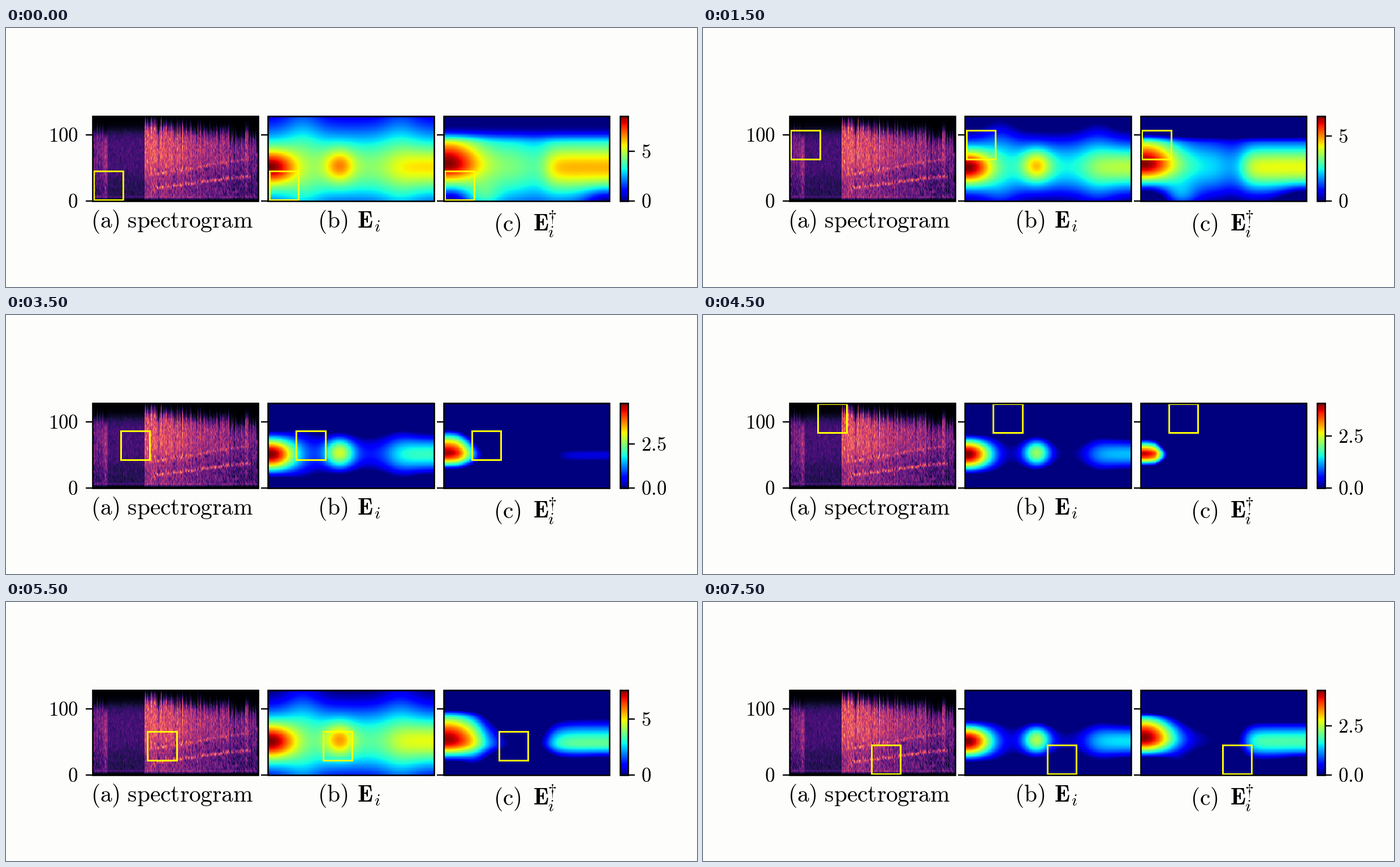
Animation of 1222 by 458 pixels, one loop 8000 ms. Source, as a matplotlib script:

```python
import numpy as np
import matplotlib.pyplot as plt
from matplotlib.animation import FuncAnimation
from matplotlib.patches import Rectangle

W, H, DPI = 1222, 458, 64
PT = 72 / DPI                      # points per pixel
TOP, BOTTOM = 156, 306.3
PANELS = [(152.8 + 310.6 * i, 446.1 + 310.6 * i) for i in range(3)]
BAR = (1085.7, 1100.4)
COLS, ROWS = 250, 128
STEPS = 5                          # box positions per column
PEAK = 8.5

plt.rcParams["mathtext.fontset"] = "cm"

# Scale maximum per box column: start, total fall, exponent of the fall
SCALE = [(8.5, 3.7, 2.2), (5.52, 1.44, 1), (8.6, 4.16, 1), (4.31, 0, 1)]


def gauss(v, center, width):
    return np.exp(-((v - center) / width) ** 2)


def sigmoid(v):
    return 1 / (1 + np.exp(-v))


def smoothstep(v):
    v = np.clip(v, 0, 1)
    return v * v * (3 - 2 * v)


def centers(panel):
    a, b = panel
    return a + (np.arange(COLS) + .5) * (b - a) / COLS


def spectrogram():
    rng = np.random.default_rng(7)
    c, r = np.arange(COLS), np.arange(ROWS)[:, None]
    loud, lead = c >= 78, c < 23
    streak = rng.normal(0, 1, COLS)
    level = np.where(loud, .33 + .3 * gauss(c, 78, 110),
                     np.where(lead, .33 + .2 * gauss(c, 19, 3), .23))
    level += np.where(loud, .05, np.where(lead, .04, .008)) * streak
    level += .12 * gauss(c, 231, 1.5)

    # Ragged upper edge, darker lower half
    reach = np.where(loud, 114 - .13 * (c - 78) + 6 * streak, 104 + 5 * lead * streak)
    reach += 15 * gauss(c, 231, 2)
    fade = sigmoid((reach - r) / np.where(loud | lead, 4, 5))
    low = sigmoid((40 + .08 * (c - 78) - r) / 8)
    body = level * (1 - .36 * low)

    grain = rng.normal(0, 1, (ROWS, COLS))
    grain = sum(np.roll(grain, i, 0) for i in range(4)) / 2
    body += grain * np.where(loud, .075, np.where(lead, .06, .032))
    for c0, r0, c1, r1, gain in [(88, 19, 232, 37, .22), (85, 39, 230, 62, .11)]:
        line = r0 + (c - c0) * (r1 - r0) / (c1 - c0) + .7 * streak
        inside = (c >= c0) & (c <= c1 + 5)
        body += gain * gauss(r, line, 2.6) * inside * (1 + .4 * grain)
    body += .08 * gauss(r, 6, 1.5)
    return np.clip(body * fade * np.clip((r - 1) / 3, 0, 1), 0, 1)


Y = (BOTTOM + (np.arange(ROWS) + .5) * (TOP - BOTTOM) / ROWS)[:, None]


def map_plain():
    x = centers(PANELS[1])
    band = 4.3 * gauss(Y, 246, 70)
    edges = (.9 * gauss(x, 525, 35) + .7 * gauss(x, 697, 35)) * (1 - gauss(Y, 246, 40))
    left = 4.2 * gauss(x, 468, 44) * gauss(Y, 247, 30)
    middle = 2.3 * gauss(x, 590, 26) * gauss(Y, 244, 29)
    right = 1.4 * sigmoid((x - 680) / 12) * gauss(Y, 247, 32)
    return band + edges + left + middle + right


def map_dagger():
    x = centers(PANELS[2])
    band = (4.2 - .4 * gauss(x, 935, 25)) * gauss(Y, 245, 75)
    left = 4.3 * gauss(x, 780, 56) * gauss(Y, 240, np.where(Y < 240, 50, 31))
    right = 1.9 * sigmoid((x - 958) / 8) * gauss(Y, 248, 35)
    hollows = (gauss(x, 785, 32) + gauss(x, 1062, 40)) * gauss(Y, 307, 25)
    foot = gauss(x, 845, 30) * gauss(Y, 300, 25)
    total = band + left + right - 2.2 * hollows + 1.2 * foot
    return total * smoothstep((Y - 172) / 34)


def damping():
    x = centers(PANELS[2])
    across = 1.6 * sigmoid((x - 840) / 8) + 2.5 * gauss(x, 915, 45)
    return across + .03 * np.maximum(0, 248 - Y) + .08 * np.maximum(0, Y - 255)


def squeezing():
    x = centers(PANELS[2])
    return np.clip(.09 * (x - 800), 0, 3) + .08 * np.maximum(0, 245 - Y)


plain, dagger, damp, squeeze = map_plain(), map_dagger(), damping(), squeezing()

fig = plt.figure(figsize=(W / DPI, H / DPI), dpi=DPI, facecolor="#fdfdfc")
ax = fig.add_axes([0, 0, 1, 1])


def image(data, span, cmap):
    return ax.imshow(data, cmap=cmap, vmin=0, vmax=1, origin="lower", aspect="auto",
                     extent=(*span, BOTTOM, TOP), interpolation="nearest", zorder=1)


def frame(span):
    return ax.add_patch(Rectangle((span[0], TOP), span[1] - span[0], BOTTOM - TOP,
                                  fill=False, lw=2.6 * PT, ec="black", zorder=4))


def tick(x, y):
    return ax.plot([x, x + 12], [y, y], color="black", lw=2.4 * PT,
                   solid_capstyle="butt", zorder=3)[0]


def label(x, y, text, size, ha="left"):
    return ax.text(x, y, f"${text}$", fontsize=size * PT, ha=ha, va="baseline")


image(spectrogram(), PANELS[0], "magma")
image_b = image(plain, PANELS[1], "jet")
image_c = image(dagger, PANELS[2], "jet")
image(np.linspace(0, 1, 256)[:, None], BAR, "jet")

boxes = []
for span in PANELS:
    border = frame(span)
    for y in (188.5, 305.6):
        tick(span[0] - 12, y)
    box = Rectangle((0, 0), 51.4, 51, fill=False, ec="yellow", lw=3 * PT, zorder=2)
    ax.add_patch(box).set_clip_path(border)
    boxes.append(box)
frame(BAR)

DIGIT, BODY, SMALL = 34.9, 41.4, 30
label(127.5, 200.6, "100", DIGIT, "right")
label(127.5, 317.6, "0", DIGIT, "right")
label(150, 353, r"\mathrm{(a)\ spectrogram}", BODY)
for x, y, name in [(551, 353, "b"), (862, 358.5, "c")]:
    label(x, y, rf"\mathrm{{({name})}}", BODY)
    label(x + 70, y, r"\mathbf{E}", BODY)
label(651, 360, "i", SMALL)
label(957.5, 370.5, "i", SMALL)
label(957.5, 341, r"\dagger", SMALL)

tick(BAR[1], 305.6)
zero = label(1123, 317.6, "0", DIGIT)
mark = tick(BAR[1], 218)
value = label(1123, 230, "5", DIGIT)

ax.set(xlim=(0, W), ylim=(H, 0))
ax.axis("off")


def update(k):
    col, row = divmod(k, STEPS)
    for box, span in zip(boxes, PANELS):
        box.set_xy((span[0] + 2.3 + 47.6 * col, 252.5 - 23.8 * row))

    start, fall, power = SCALE[col]
    vmax = start - fall * (row / (STEPS - 1)) ** power
    drop = PEAK - vmax
    loss = (damp * np.interp(k, [5, 9, 11, 15], [0, 1.2, 1, 0])
            + squeeze * np.interp(k, [6, 9, 10], [0, 1, 0]))
    image_b.set_data(np.clip((plain - drop) / vmax, 0, 1))
    image_c.set_data(np.clip((dagger - drop - loss) / vmax, 0, 1))

    step = 5 if vmax >= 5 else 2.5
    y = BOTTOM - (BOTTOM - TOP) * step / vmax
    mark.set_ydata([y, y])
    value.set_y(y + 12)
    value.set_text(f"${step}$")
    zero.set_text("$0$" if step == 5 else "$0.0$")
    return [image_b, image_c, mark, value, zero, *boxes]


anim = FuncAnimation(fig, update, frames=16, interval=500, repeat=True, repeat_delay=0)
plt.show()
```
